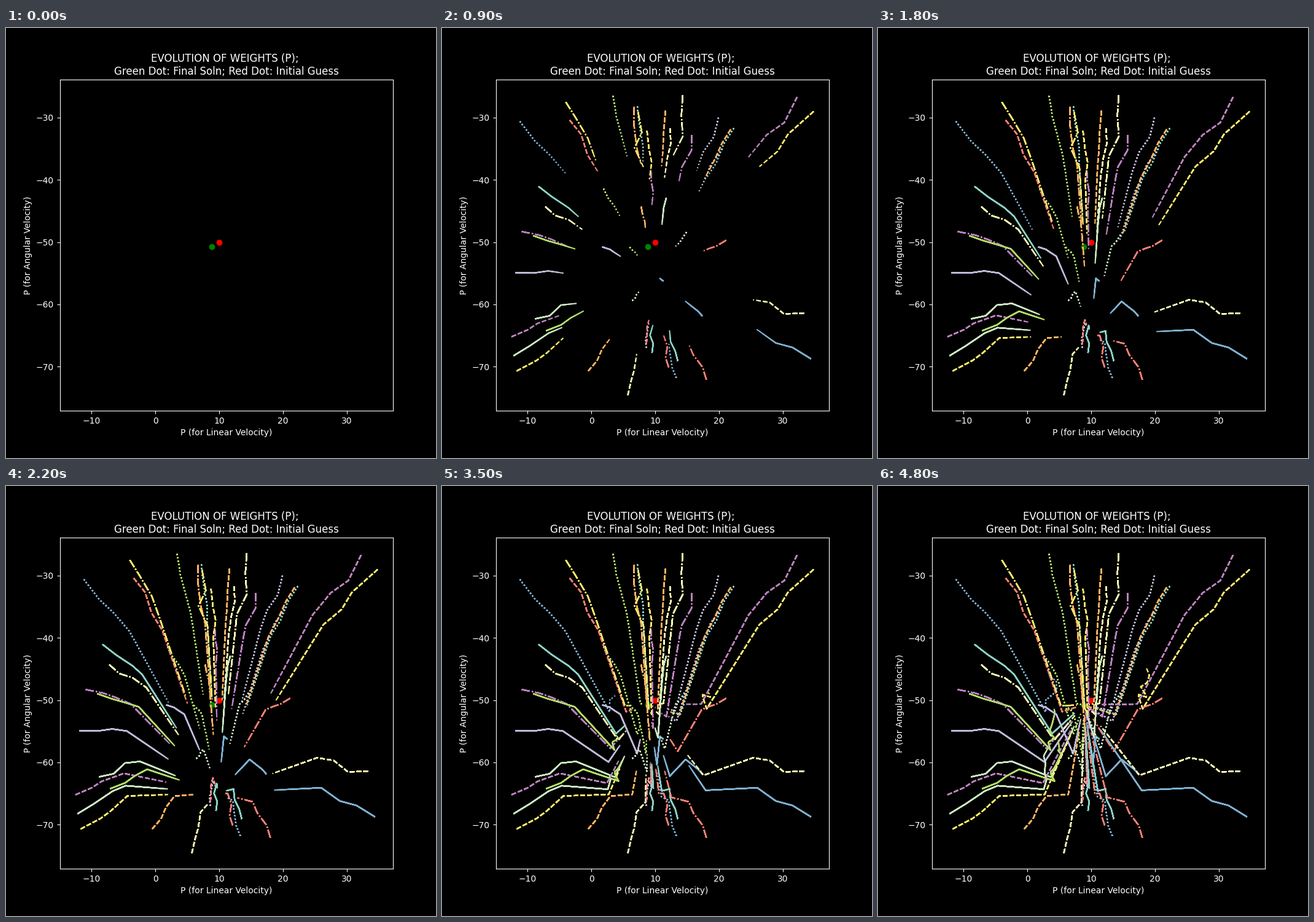
Animation of 700x700 px, one loop 4900 ms. Source, as a matplotlib script:

```python
import numpy as np
import matplotlib.pyplot as plt
from matplotlib.animation import FuncAnimation

FRAMES = 49
LAYERS = 12                       # repeated strokes thicken the older parts
STYLES = ["-", "--", ":", "-."]   # cycles along with the ten colours
GUESS, SOLN = np.array([10, -50]), np.array([8.85, -50.75])
PULL = np.array([9.8, -55.1])     # where the first leg heads
DIP = np.array([9.8, -64.9])      # where the second leg heads

# Starting weights, five runs per colour
STARTS = {
    "#8dd3c7": [(-8.2, -41.1), (7.2, -28.2), (13.5, -69), (22.3, -31.7), (9.5, -67.7)],
    "#feffb3": [(5.7, -74.6), (-7.2, -44.3), (12.3, -31.7), (14.3, -26.4), (33.3, -61.4)],
    "#bfbbd9": [(19.9, -30), (-11.8, -54.9), (20.5, -35), (1.8, -50.8), (8.6, -67)],
    "#fa8174": [(21.1, -49.7), (-3.4, -30.4), (18, -72.1), (8.6, -66.3), (12.1, -70.1)],
    "#81b1d2": [(11.2, -56.2), (-11.2, -30.6), (17.3, -61.8), (13.3, -71.8), (34.3, -68.7)],
    "#fdb462": [(-0.5, -70.7), (6.7, -28.3), (21.8, -31.9), (7.8, -44.3), (11.6, -28.9)],
    "#b3de69": [(3.4, -26.5), (-9, -49), (1.9, -41.4), (-7, -64.2), (6, -50.8)],
    "#bc82bd": [(-10.9, -48.3), (-12.5, -65.2), (9.3, -38.4), (32.2, -26.7), (15.7, -32.8)],
    "#ccebc4": [(-8.7, -62.3), (14.9, -48.4), (-12.1, -68.2), (6.4, -59.4), (11.7, -43)],
    "#ffed6f": [(-11.7, -70.7), (-4, -27.5), (8.7, -32.1), (7.3, -29.1), (34.8, -29)],
}
STALLED = {14, 16, 36, 28, 49}    # runs that drift upwards instead of settling

rng = np.random.default_rng(4)
frames = np.arange(FRAMES)


def progress(first, last, power=1.0):
    """0 to 1 between two frames, slowing down when power > 1."""
    u = np.clip((frames - first) / (last - first), 0, 1)
    return (1 - (1 - u) ** power)[:, None]


def wobble(first, last, size, knots=4):
    """Random kinks that vanish at both ends of a leg."""
    offsets = rng.normal(0, size, (2, knots))
    offsets[:, [0, -1]] = 0
    at = np.linspace(first, last, knots)
    return np.column_stack([np.interp(frames, at, o) for o in offsets])


def descend(start, stalled):
    """Weights at every frame: three legs, each part way to its goal."""
    first = 0.34 * (PULL - start)
    second = 0.5 * (DIP - start - first)
    bend = start + first + second
    third = np.array([0.6, 6.5]) if stalled else 0.7 * (SOLN - bend)
    size = 0.04 * np.hypot(*first)
    path = (start + progress(0, 9) * first
            + progress(9, 26, 1.6) * second
            + progress(26, 48) * third + wobble(0, 9, size))
    if stalled:
        path += wobble(26, 48, 0.6, 7)
    return path


plt.style.use("dark_background")
fig, ax = plt.subplots(figsize=(7, 7), dpi=100)
ax.set(xlim=(-14.97, 37.2), ylim=(-77.08, -23.89),
       xlabel="P (for Linear Velocity)", ylabel="P (for Angular Velocity)")
ax.set_title("EVOLUTION OF WEIGHTS (P); \n"
             "Green Dot: Final Soln; Red Dot: Initial Guess")
ax.plot(*GUESS, "o", color="red")
ax.plot(*SOLN, "o", color="green")

runs = []
for k in range(5):
    for color, starts in STARTS.items():
        i = len(runs)
        path = descend(np.array(starts[k]), i in STALLED)
        runs.append((path, dict(color=color, ls=STYLES[i % 4])))

strokes = [(lag, path, ax.plot([], [], **look)[0])
           for lag in reversed(range(LAYERS)) for path, look in runs]


def update(n):
    for lag, path, line in strokes:
        last = n - lag
        line.set_data(*path[:last + 1 if last > 0 else 0].T)
    return [line for *_, line in strokes]


anim = FuncAnimation(fig, update, frames=FRAMES, interval=100,
                     repeat=True, repeat_delay=0, blit=False)
plt.show()
```
